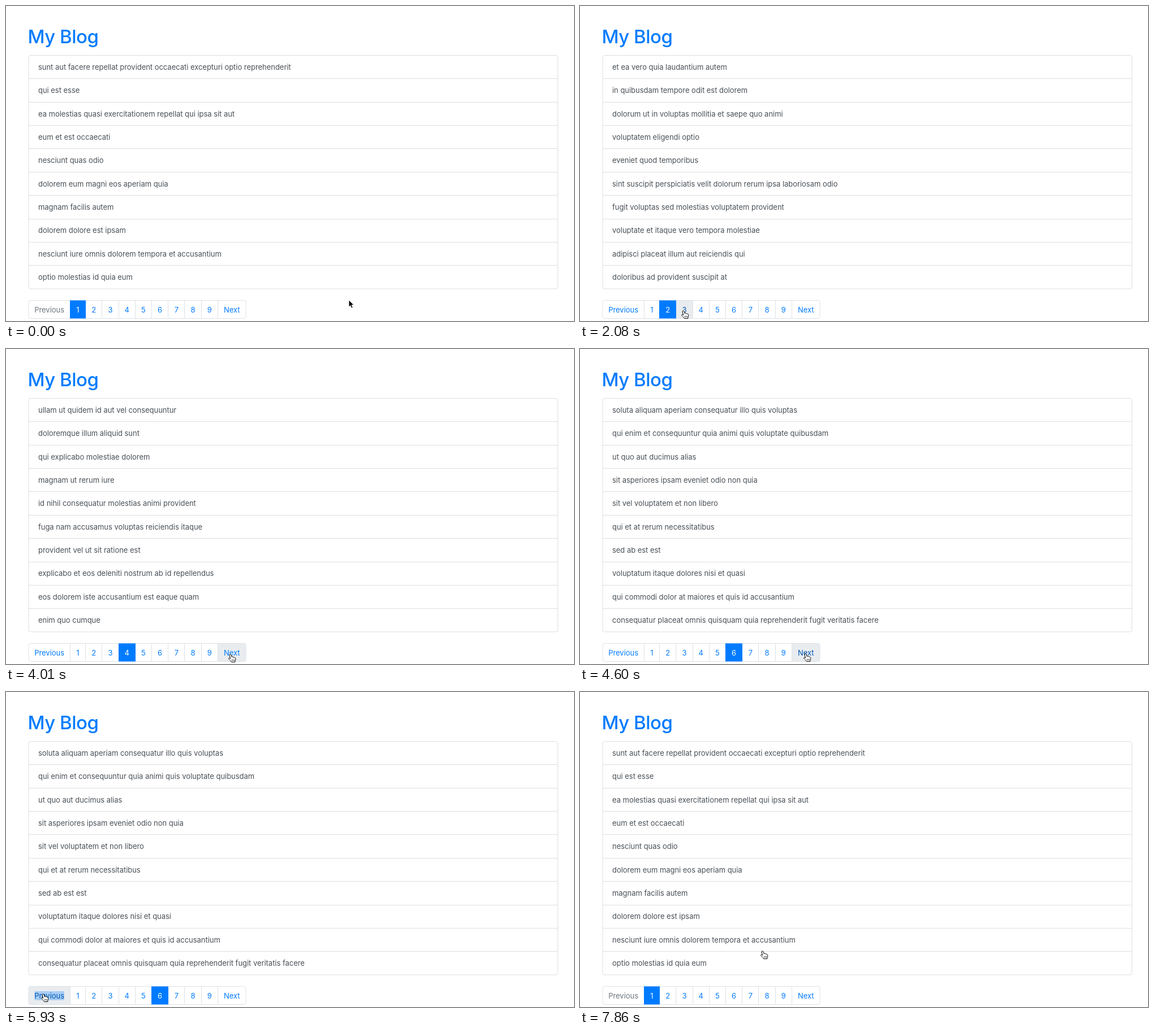
Write an HTML page that moves like this. It is 1004 px wide and 558 px high and loops after 8000 ms.

```html
<!DOCTYPE html>
<html lang="en">
<head>
<meta charset="utf-8">
<title>My Blog</title>
<style>
html, body { margin: 0; width: 100%; height: 100%; overflow: hidden; background: #fff; }
svg { display: block; width: 1004px; height: 558px; font: 13px Inter, "Open Sans", sans-serif; letter-spacing: -.035px; }
.title { font-size: 33px; font-weight: 500; letter-spacing: -.5px; fill: #007bff; }
.row { fill: #495057; }
.label { text-anchor: middle; }
.frame { fill: none; stroke: #dfdfdf; }
.pager { fill: none; stroke: #dee2e6; }
</style>
</head>
<body>
<svg viewBox="0 0 1004 558">
  <text class="title" x="38.5" y="66">My Blog</text>
  <g id="list"></g>
  <g id="pager"></g>
  <g id="cursor"></g>
</svg>
<script>
const LOOP = 8000, STEP = 148.3;
const pages = `sunt aut facere repellat provident occaecati excepturi optio reprehenderit
qui est esse
ea molestias quasi exercitationem repellat qui ipsa sit aut
eum et est occaecati
nesciunt quas odio
dolorem eum magni eos aperiam quia
magnam facilis autem
dolorem dolore est ipsam
nesciunt iure omnis dolorem tempora et accusantium
optio molestias id quia eum

et ea vero quia laudantium autem
in quibusdam tempore odit est dolorem
dolorum ut in voluptas mollitia et saepe quo animi
voluptatem eligendi optio
eveniet quod temporibus
sint suscipit perspiciatis velit dolorum rerum ipsa laboriosam odio
fugit voluptas sed molestias voluptatem provident
voluptate et itaque vero tempora molestiae
adipisci placeat illum aut reiciendis qui
doloribus ad provident suscipit at

asperiores ea ipsam voluptatibus modi minima quia sint
dolor sint quo a velit explicabo quia nam
maxime id vitae nihil numquam
autem hic labore sunt dolores incidunt
rem alias distinctio quo quis
est et quae odit qui non
quasi id et eos tenetur aut quo autem
delectus ullam et corporis nulla voluptas sequi
iusto eius quod necessitatibus culpa ea
a quo magni similique perferendis

ullam ut quidem id aut vel consequuntur
doloremque illum aliquid sunt
qui explicabo molestiae dolorem
magnam ut rerum iure
id nihil consequatur molestias animi provident
fuga nam accusamus voluptas reiciendis itaque
provident vel ut sit ratione est
explicabo et eos deleniti nostrum ab id repellendus
eos dolorem iste accusantium est eaque quam
enim quo cumque

non est facere
commodi ullam sint et excepturi error explicabo praesentium voluptas
eligendi iste nostrum consequuntur adipisci praesentium sit beatae perferendis
optio dolor molestias sit
ut numquam possimus omnis eius suscipit laudantium iure
aut quo modi neque nostrum ducimus
quibusdam cumque rem aut deserunt
ut voluptatem illum ea doloribus itaque eos
laborum non sunt aut ut assumenda perspiciatis voluptas
repellendus qui recusandae incidunt voluptates tenetur qui omnis exercitationem

soluta aliquam aperiam consequatur illo quis voluptas
qui enim et consequuntur quia animi quis voluptate quibusdam
ut quo aut ducimus alias
sit asperiores ipsam eveniet odio non quia
sit vel voluptatem et non libero
qui et at rerum necessitatibus
sed ab est est
voluptatum itaque dolores nisi et quasi
qui commodi dolor at maiores et quis id accusantium
consequatur placeat omnis quisquam quia reprehenderit fugit veritatis facere

voluptatem doloribus consectetur est ut ducimus
beatae enim quia vel
voluptas blanditiis repellendus animi ducimus error sapiente et suscipit
et fugit quas eum in in aperiam quod
consequatur id enim sunt et et
repudiandae ea animi iusto
aliquid eos sed fuga est maxime repellendus
odio quis facere architecto reiciendis optio
fugiat quod pariatur odit minima
voluptatem laborum magni`.split("\n\n").map(p => p.split("\n"));

// [step, page] for clicks; [step, x, y] for the pointer
const clicks = [[0, 1], [8, 2], [17, 3], [22, 4], [29, 5], [31, 6], [34, 7], [38, 6], [41, 5], [43, 4], [48, 1]];
const path = [[0, 606, 521], [2, 520, 499], [6, 151, 536], [8, 151, 536], [14, 184, 540], [17, 184, 540],
  [20, 213, 541], [23, 213, 541], [27, 398, 541], [29, 400, 540], [34, 400, 540], [38, 67, 536],
  [40, 67, 535], [43, 67, 535], [46, 125, 540], [48, 125, 540], [53, 324, 459]];
const labels = ["Previous", 1, 2, 3, 4, 5, 6, 7, 8, 9, "Next"];
const edges = [40, 113.2, ...Array.from({ length: 9 }, (_, i) => 140.6 + 29.23 * i), 424];
const TOP = 521.5, BOTTOM = 553.5, ROW = 41.37;

const ARROW = `<path d="M0 0V12.2L2.8 9.6L4.8 14.2L7 13.2L5 8.8L8.8 8.6Z" fill="#000" stroke="#fff" stroke-width=".8"/>`;
const HAND = `<g transform="translate(-1 0)"><path d="M-2 1C-1.5-.6.6-.6 1 1L2 4.6C3 3.6 4.3 4 4.6 5
  C5.6 4.4 6.8 5 7 6C8 5.6 8.8 6.2 8.8 7.4C9 9.5 8.1 10.5 7.8 12V13.6H1.6C1 11.8-1 10.6-2 9.4
  C-3.2 8.2-4 7.2-3 6.6C-2.2 6-1.2 6.8-.4 7.6Z" fill="#fff" stroke="#000" stroke-linejoin="round"/>
  <path d="M2.5 8.8v2.8M4.4 8.8v2.8M6.3 8.8v2.8" stroke="#000" stroke-width=".7"/></g>`;

const $ = id => document.getElementById(id);
const snap = v => Math.floor(v) + .5;
const text = (cls, x, y, s, fill) =>
  `<text class="${cls}" x="${x}" y="${y}"${fill ? ` fill="${fill}"` : ""}>${s}</text>`;
const rect = (x, y, w, h, rest) => `<rect x="${x}" y="${y}" width="${w}" height="${h}" ${rest}/>`;

function pointer(n) {
  const i = path.findIndex(p => p[0] > n);
  if (i < 0) return path.at(-1).slice(1);
  const [a, ax, ay] = path[i - 1], [b, bx, by] = path[i];
  const u = (n - a) / (b - a), k = u * u * (3 - 2 * u);
  return [ax + (bx - ax) * k, ay + (by - ay) * k];
}

const hovered = ([x, y]) =>
  y < TOP || y > BOTTOM ? -1 : labels.findIndex((_, i) => x >= edges[i] && x < edges[i + 1]);

function drawList(page) {
  let s = rect(40, 87.5, 935.5, 413.5, 'rx="3.4" class="frame"');
  pages[page - 1].forEach((title, i) => {
    const y = 87.5 + ROW * i;
    if (i) s += `<path class="frame" d="M40 ${snap(y)}H975.5"/>`;
    s += text("row", 57, y + 25.4, title);
  });
  $("list").innerHTML = s;
}

function drawPager(page, over, settled, selected) {
  let back = "", divs = "", active = "", names = "";
  labels.forEach((label, i) => {
    const x = edges[i], w = edges[i + 1] - x, off = page === 1 && i === 0;
    const hot = i === over && !off && i !== page;
    const fill = i === page ? "#fff" : off ? "#6c757d" : hot && settled ? "#0056b3" : "#007bff";
    if (hot) back += rect(x, TOP, w, BOTTOM - TOP, 'rx="1.5" fill="#e9ecef"');
    if (i === 0 && selected) back += rect(50.5, 530, 52.5, 16, `fill="${hot ? "#a8cef7" : "#b3d7ff"}"`);
    if (i) divs += `M${snap(x)} ${TOP}V${BOTTOM}`;
    if (i === page) {
      const left = Math.floor(x + .3);
      active = rect(left, TOP, Math.ceil(x + w) - left, BOTTOM - TOP, 'fill="#007bff"');
    }
    names += text("label", x + w / 2, 542.7, label, fill);
  });
  $("pager").innerHTML = back + rect(40, TOP, 384, BOTTOM - TOP, 'rx="3.4" class="pager"') +
    `<path class="pager" d="${divs}"/>` + active + names;
}

function draw(n) {
  const page = clicks.findLast(c => c[0] <= n)[1];
  const pos = pointer(n), over = hovered(pos);
  const [x, y] = pos;
  drawList(page);
  drawPager(page, over, n > 0 && hovered(pointer(n - 1)) === over, n >= 40 && n < 48);
  $("cursor").setAttribute("transform", `translate(${x} ${y})`);
  $("cursor").innerHTML = over >= 0 || y < 501 ? HAND : ARROW;
}

let last = -1;
function tick() {
  const n = Math.min(53, Math.floor((performance.now() % LOOP + 3) / STEP));
  if (n !== last) draw(last = n);
  requestAnimationFrame(tick);
}
tick();
</script>
</body>
</html>
```
